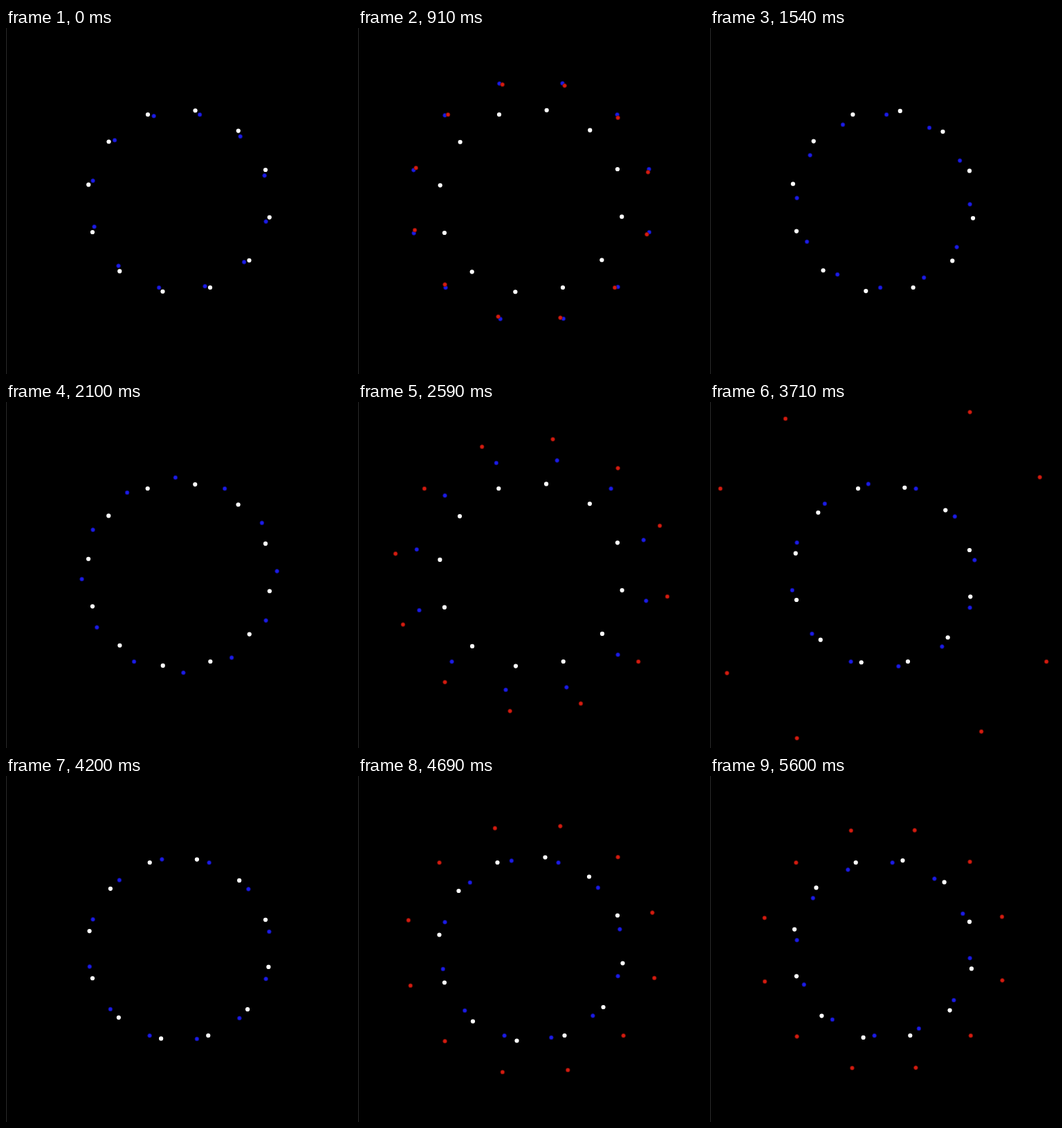
An HTML page for the animation above (5.67 s loop, 500x500 px).

```html
<!DOCTYPE html>
<html lang="en">
<head>
<meta charset="utf-8">
<title>Dots on tangent lines</title>
<style>
html, body { margin: 0; width: 100%; height: 100%; overflow: hidden; background: #000; }
svg { display: block; width: 100vw; height: 100vh; }
</style>
</head>
<body>
<svg id="stage" viewBox="0 0 500 500">
  <rect width="500" height="500" fill="#000"/>
  <rect width="1" height="500" fill="#2a2a2a"/>
</svg>
<script>
const NS = 'http://www.w3.org/2000/svg';
const STEP = 70, STEPS = 81, COUNT = 12, RADIUS = 125;
const stage = document.getElementById('stage');

// Each ring slides along tangents of one circle, easing between shared beats.
// A swing throws the ring outwards once between two beats.
const beats = [0, 13, 22, 37, 53, 67, 80];
const rings = [
  { fill: '#1c1ce6', edge: '#0c0c80', r: 2.9, shift: 0.6, swing: 0,
    slides: [29.5, 124, 4.5, 115, 47, 39, 13] },
  { fill: '#d41c10', edge: '#700c06', r: 2.9, shift: 0.6, swing: 160,
    slides: [-330, -120.5, -330, -154.6, -235.6, -133, -126.2] },
  { fill: '#fff', edge: 'none', r: 3.1, shift: 0, swing: 0,
    slides: [-45, -46, -43.6, -46.7, -36, -48.5, -39.3] }
];

function make(tag, attrs) {
  const el = document.createElementNS(NS, tag);
  for (const key in attrs) el.setAttribute(key, attrs[key]);
  return stage.appendChild(el);
}

for (const ring of rings) {
  const { r, fill, edge } = ring;
  ring.dots = Array.from({ length: COUNT }, () =>
    make('circle', { r, fill, stroke: edge, 'stroke-width': 0.8 }));
}

function slideAt({ slides, swing }, step) {
  const i = Math.max(1, beats.findIndex(beat => beat >= step));
  const u = (step - beats[i - 1]) / (beats[i] - beats[i - 1]);
  const ease = (1 - Math.cos(Math.PI * u)) / 2;
  return slides[i - 1] + (slides[i] - slides[i - 1]) * ease
    - swing * Math.sin(Math.PI * u) ** 2;
}

function draw(ms) {
  const step = Math.floor(ms / STEP + 1e-6) % STEPS;
  for (const ring of rings) {
    const slide = slideAt(ring, step);
    ring.dots.forEach((dot, k) => {
      const a = k * 2 * Math.PI / COUNT, c = Math.cos(a), s = Math.sin(a);
      dot.setAttribute('cx', (250 + ring.shift + RADIUS * c - slide * s).toFixed(2));
      dot.setAttribute('cy', (250 + ring.shift / 3 + RADIUS * s + slide * c).toFixed(2));
    });
  }
}

let start;
function tick(now) {
  if (start === undefined) start = now;
  draw(Math.max(0, now - start));
  requestAnimationFrame(tick);
}
draw(0);
requestAnimationFrame(tick);
</script>
</body>
</html>
```
